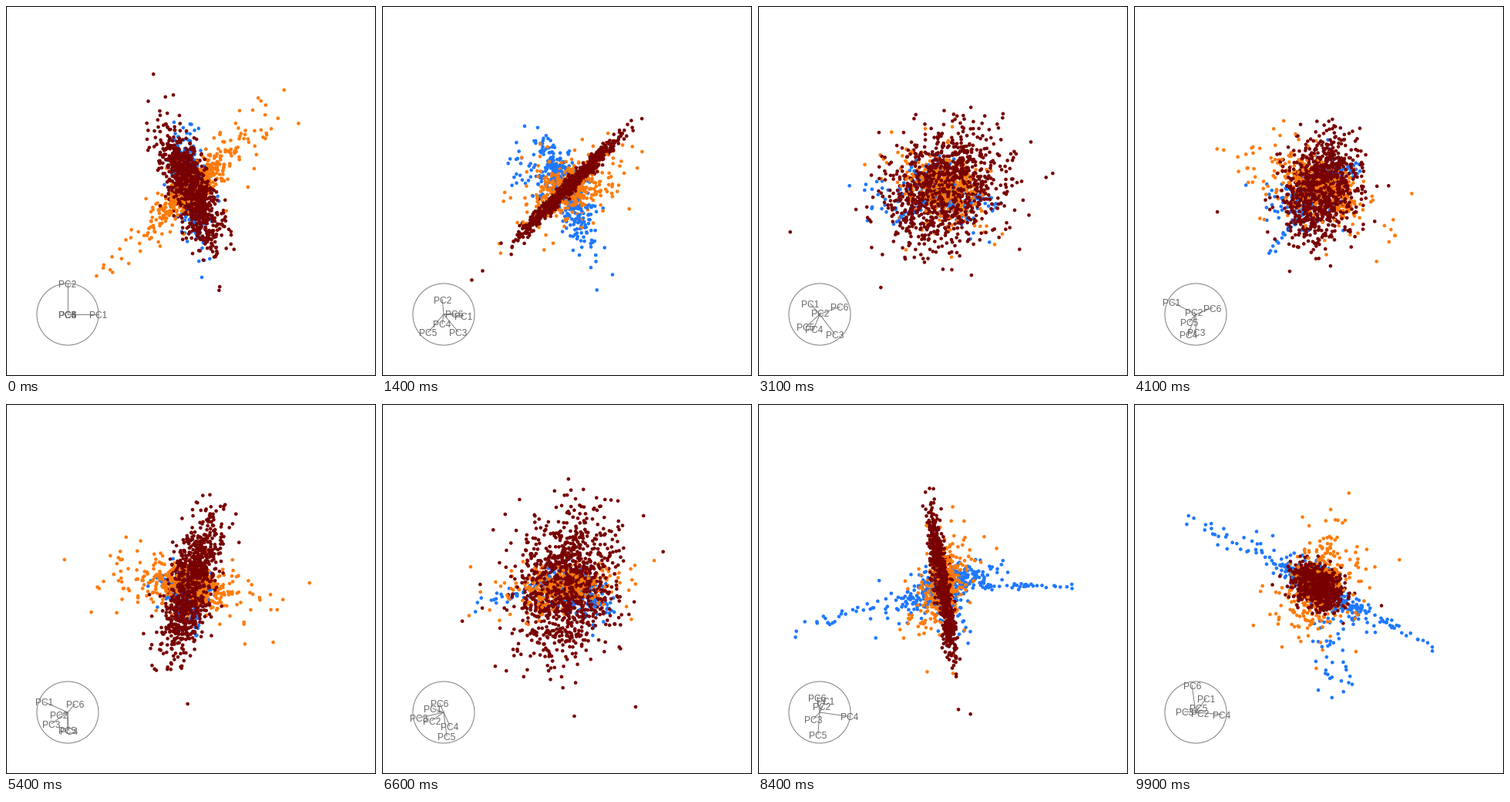
A matplotlib script that plays this animation: 480 px wide and 480 px high, repeating every 10 s.

```python
"""Grand tour: a rotating 2-D projection of three clusters in six dimensions."""
import numpy as np
import matplotlib.pyplot as plt
from matplotlib.animation import FuncAnimation

SIZE, FRAMES, INTERVAL = 480, 100, 100
CENTER, HUB, RADIUS = np.array([240, 243]), np.array([80, 80]), 40
BLUE, ORANGE, RED = "#1e78ff", "#ff7b0a", "#780000"
rng = np.random.default_rng(11)


def orthonormal(m):
    u, _, vt = np.linalg.svd(m, full_matrices=False)
    return u @ vt


# Key poses of the tour: frame -> x row and y row of the projection.
POSES = {
    0: np.eye(2, 6),
    14: [[.63, -.04, .46, -.05, -.50, .33], [-.04, .49, -.57, -.31, -.59, .03]],
    31: [[-.30, .03, .49, -.20, -.45, .65], [.36, .05, -.68, -.50, -.43, .26]],
    41: [[-.78, -.05, 0, -.25, -.21, .55], [.40, .08, -.57, -.65, -.25, .22]],
    66: [[-.36, -.39, -.82, .20, .10, -.13], [.13, -.27, -.19, -.45, -.79, .30]],
    84: [[.18, .07, -.20, .95, -.05, -.08], [.38, .20, -.22, -.14, -.72, .48]],
    99: [[.34, .14, -.35, .85, .10, -.13], [.45, -.03, .03, -.08, .15, .86]],
}
TIMES = list(POSES)
BASES = [orthonormal(np.array(p)) for p in POSES.values()]


def basis(frame):
    k = min(np.searchsorted(TIMES, frame, side="right"), len(TIMES) - 1) - 1
    t = (frame - TIMES[k]) / (TIMES[k + 1] - TIMES[k])
    return orthonormal((1 - t) * BASES[k] + t * BASES[k + 1])


def cloud(n, tail, noise, *axes):
    """Heavy-tailed blob stretched along the given 6-D axes."""
    spread = np.exp(tail * rng.standard_normal((n, 1)) - tail ** 2)
    blob = rng.standard_normal((n, len(axes))) @ np.array(axes)
    return spread * (blob + noise * rng.standard_normal((n, 6)))


def arm(n, noise, tip):
    """Points scattered along a ray, thinning towards its tip."""
    t = .25 + .85 * rng.random((n, 1)) ** 1.4
    return t * np.array(tip) + noise * rng.standard_normal((n, 6))


CLUSTERS = [
    (BLUE, 0, np.vstack([
        cloud(340, .25, 9, (-5, 32, -22, 0, 0, 0), (0, 0, 10, -22, 20, 12)),
        arm(36, 2.5, (0, 0, -30, 150, -60, -60)),
        arm(34, 6, (0, 0, 100, -160, 120, 65)),
        arm(42, 13, (-20, 20, -35, 0, -12, -150)),
    ])),
    (ORANGE, .45, cloud(480, .42, 11, (35, 33, 0, 0, 0, 0),
                        (0, 0, 18, 0, 0, 0), (0, 0, 0, 0, 0, 24))),
    (RED, .75, cloud(1050, .12, 3, (0, 0, 0, 8, 44, -18),
                     (-16, 35, 30, 7, 0, 0), (9, 10, 0, 0, 0, 0))),
]
points = np.vstack([c[2] for c in CLUSTERS])
colors = np.concatenate([[color] * len(p) for color, _, p in CLUSTERS])
depth = np.concatenate([z + rng.random(len(p)) for _, z, p in CLUSTERS])
order = np.argsort(depth)
points, colors = points[order], colors[order]

fig = plt.figure(figsize=(4.8, 4.8), dpi=100, facecolor="white")
ax = fig.add_axes([0, 0, 1, 1])
ax.set(xlim=(0, SIZE), ylim=(0, SIZE))
ax.axis("off")
ax.add_patch(plt.Rectangle((.5, .5), SIZE - 1, SIZE - 1, fill=False,
                           ec="black", lw=.72, snap=False))
ax.add_patch(plt.Circle(HUB, RADIUS, fill=False, ec="#7f7f7f", lw=.72))
spokes = [ax.plot([], [], color="#7f7f7f", lw=.72, zorder=1)[0]
          for _ in range(6)]
labels = [ax.text(0, 0, f"PC{i + 1}", family="Liberation Sans", size=8.64,
                  color="#666666", ha="center", va="baseline", zorder=2)
          for i in range(6)]
dots = ax.scatter(*np.zeros((2, len(points))), s=11, c=colors, linewidths=0,
                  zorder=3)


def update(frame):
    proj = basis(frame)
    dots.set_offsets(CENTER + points @ proj.T)
    for spoke, label, axis in zip(spokes, labels, proj.T):
        x, y = HUB + RADIUS * axis
        spoke.set_data([HUB[0], x], [HUB[1], y])
        label.set_position((x, y - 5))
    return [dots, *spokes, *labels]


anim = FuncAnimation(fig, update, frames=FRAMES, interval=INTERVAL,
                     repeat=True, repeat_delay=0)
plt.show()
```
